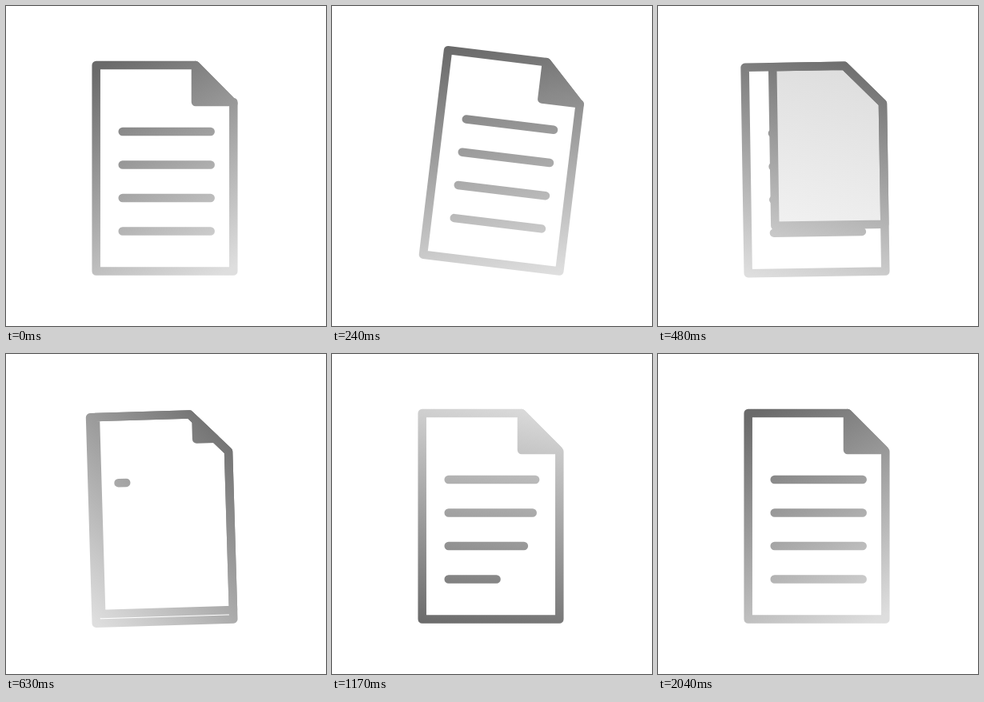
An HTML page that plays this animation: 400 px wide and 400 px high, repeating every 3400 ms.

```html
<!DOCTYPE html>
<html lang="en">
<head>
<meta charset="utf-8">
<title>Page turn</title>
<style>
  html, body { margin: 0; width: 100%; height: 100%; overflow: hidden; background: #fff; }
  svg { display: block; width: 100vw; height: 100vh; }
</style>
</head>
<body>
<svg viewBox="0 0 400 400">
  <defs>
    <linearGradient id="shade" gradientUnits="userSpaceOnUse" x1="48.5" y1="203" x2="348.5" y2="203">
      <stop offset="0" stop-color="#6a6a6a"/>
      <stop offset="1" stop-color="#dedede"/>
    </linearGradient>
  </defs>
  <g id="page" fill="none" stroke="url(#shade)" stroke-width="10.5" stroke-linecap="round" stroke-linejoin="round">
    <path id="oldLines"/>
    <g id="turn">
      <path class="leaf" fill="#fff" stroke="none"/>
      <path class="leaf" id="leafTop" fill="url(#shade)"/>
    </g>
    <path d="M112.7 74H237L284.3 121.7V331.5H112.7Z"/>
    <path id="fold" fill="url(#shade)"/>
    <path id="newLines"/>
  </g>
</svg>
<script>
const LOOP = 3400, TURN_START = 240, TURN_END = 750;
const $ = id => document.getElementById(id);
const leaves = document.querySelectorAll('.leaf');

const clamp = x => Math.min(1, Math.max(0, x));
const progress = (t, from, to) => clamp((t - from) / (to - from));
const mix = (a, b, k) => a + (b - a) * k;
const quadOut = p => 1 - (1 - p) ** 2;
const sineInOut = p => (1 - Math.cos(Math.PI * p)) / 2;
const expoOut = p => p < 1 ? 1 - 2 ** (-10 * p) : 1;

// Swing of the page: time, degrees, slope in degrees per ms
const swing = [
  [0, 0, 0], [255, 7, 0], [390, 3.35, -.033], [555, -3, 0],
  [630, -1.73, .017], [840, 1.8, 0], [1080, 0, 0]
];

function tilt(t) {
  const i = swing.findIndex(key => key[0] > t);
  if (i < 0) return 0;
  const [t0, a, m] = swing[i - 1], [t1, b, n] = swing[i];
  const d = t1 - t0, p = (t - t0) / d, q = 1 - p;
  return q * q * (1 + 2 * p) * a + p * p * (3 - 2 * p) * b + d * p * q * (q * m - p * n);
}

// Four text lines, each drawn to its share of the full length
function linesPath(share) {
  let d = '';
  for (let i = 0; i < 4; i++) {
    const k = share(i);
    if (k > 0) d += `M145.7 ${157 + 41.5 * i}h${110 * k}`;
  }
  return d;
}

function draw(t) {
  $('page').setAttribute('transform', `rotate(${tilt(t)} 284.3 331.5)`);
  const angle = 60 + 360 * sineInOut(progress(t, 0, 2040));
  $('shade').setAttribute('gradientTransform', `rotate(${angle} 198.5 203)`);

  // The folded corner grows over the whole sheet and fades to white
  const turning = t < TURN_END;
  $('turn').style.display = $('oldLines').style.display = turning ? '' : 'none';
  const s = quadOut(progress(t, TURN_START, TURN_END));
  const x = mix(237, 112.7, s), y = mix(120, 331.5, s);
  for (const leaf of leaves) leaf.setAttribute('d', `M237 74H${x}V${y}H284.3V121.7Z`);
  $('leafTop').setAttribute('fill-opacity', clamp(1 - 1.06 * s));

  // A new corner folds out of the slanted edge
  const k = progress(t, 510, TURN_END);
  const cx = mix(253, 237, k), cy = mix(90, 120, k);
  $('fold').setAttribute('d', k > 0 ? `M${cx} ${cx - 163}V${cy}H${cy + 163}Z` : '');

  $('newLines').setAttribute('d', linesPath(i => expoOut(progress(t, 619 + 150 * i, 1519 + 150 * i))));
}

$('oldLines').setAttribute('d', linesPath(() => 1));
const start = performance.now();
function tick() {
  draw((performance.now() - start) % LOOP);
  requestAnimationFrame(tick);
}
tick();
</script>
</body>
</html>
```
